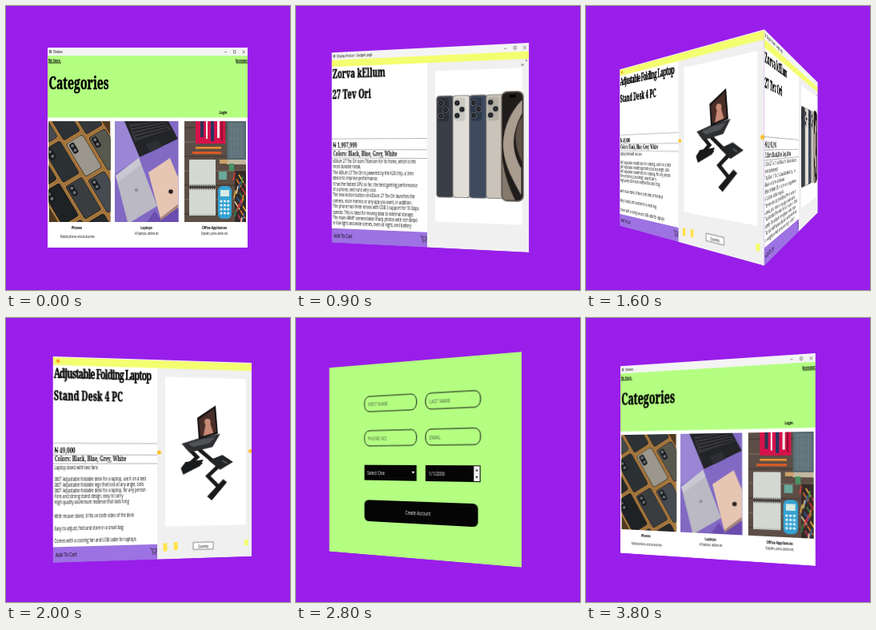
An HTML page that plays this animation: 355 px wide and 355 px high, repeating every 3.9 s.

```html
<!DOCTYPE html>
<html lang="en">
<head>
<meta charset="utf-8">
<title>Shop cube</title>
<style>
  html, body { margin: 0; width: 100%; height: 100%; overflow: hidden; background: #991eea; }
  #stage { position: relative; width: 355px; height: 355px; overflow: hidden; perspective: 308px; perspective-origin: 177px 177px; }
  #cube { position: absolute; left: 52px; top: 52px; width: 250px; height: 250px; transform-style: preserve-3d; }
  .face { position: absolute; inset: 0; width: 250px; height: 250px; backface-visibility: hidden; }
  text { font-family: "Open Sans", "Noto Sans", sans-serif; white-space: pre; }
  .serif { font-family: "Noto Serif", serif; font-weight: bold; }
  .heavy { font-weight: 900; stroke: #000; stroke-width: .5px; }
  .label { font-weight: bold; }
</style>
</head>
<body>
<div id="stage"><div id="cube"></div></div>
<script>
const LOOP = 3900, STEP = 100;
const GREEN = '#b4ff82', YELLOW = '#f4ff70', INK = '#050505';

// Drawing helpers; pages are wide windows squeezed into square faces.
const text = (x, y, size, str, attrs = '') =>
  `<text transform="translate(${x} ${y}) scale(.67 1)" font-size="${size}" ${attrs}>${str}</text>`;
const mid = (x, y, size, str, attrs = '') => text(x, y, size, str, `text-anchor="middle" ${attrs}`);
const rect = (x, y, w, h, fill, attrs = '') =>
  `<rect x="${x}" y="${y}" width="${w}" height="${h}" fill="${fill}" ${attrs}/>`;
const disc = (x, y, r, fill) => `<circle cx="${x}" cy="${y}" r="${r}" fill="${fill}"/>`;
const poly = (points, fill) => `<polygon points="${points}" fill="${fill}"/>`;
const line = (d, color = '#555', width = .6) =>
  `<path d="${d}" fill="none" stroke="${color}" stroke-width="${width}"/>`;
const photo = (x, y, w, h, body) => `<svg x="${x}" y="${y}" width="${w}" height="${h}">${body}</svg>`;
const repeat = (n, fn) => Array.from({ length: n }, (_, i) => fn(i)).join('');

const titleBar = name => rect(0, 0, 250, 10, '#f4f4f4') + rect(2, 3, 3, 4, '#888') +
  text(7, 7.2, 5, name) +
  line('M221 5.5h3M232.5 3.5h2.5v3.5h-2.5zM243.5 3.5l3 4m0-4l-3 4', '#333', .5);

function phonesPhoto() {
  const colors = ['#3a3d3f', '#57594f', '#2b3033', '#33373a', '#454b50', '#1f2224', '#9b978c', '#26292b', '#2e3235'];
  const phones = repeat(16, i => {
    const x = (i % 4) * 28 - 54, y = Math.floor(i / 4) * 53 - 108 + (i % 4) * 8;
    return rect(x - 2, y - 2, 28, 53, '#a9793f') + rect(x + .5, y + .5, 24, 48, '#111', 'rx="3"') +
      rect(x + 1, y + 1, 23, 47, colors[(i * 4) % 9], 'rx="3"') +
      rect(x + 3, y + 3, 7, 14, '#17191b', 'rx="2"') +
      disc(x + 6.5, y + 6.5, 2, '#6c7378') + disc(x + 6.5, y + 13, 2, '#6c7378');
  });
  return rect(0, 0, 77, 126, '#4f3920') + `<g transform="translate(39 63) rotate(-31)">${phones}</g>`;
}

function laptopsPhoto() {
  return rect(0, 0, 80, 126, '#8269c4') + poly('0,0 14,0 32,46 0,66', '#9a86d4') +
    poly('50,112 57,122 80,108 80,126 40,126', '#6a4dae') +
    poly('12,0 67,0 79,22 31,45', '#232428') + poly('18,4 62,0 70,10 25,25', '#36373c') +
    repeat(4, i => line(`M${20 + i * 2} ${8 + i * 4}l${44 - i} -${8 + i}`, '#141416', 1)) +
    poly('39,29 54,23 59,32 44,39', '#2e2f34') +
    poly('1,68 30,46 53,106 20,126 16,126', '#bab9c4') + poly('1,68 30,46 33,54 4,76', '#c9c8d2') +
    disc(27, 86, 2.2, '#92919b') +
    poly('42,64 69,46 79,70 79,104 57,121', '#e6c6b2') + poly('57,121 79,104 79,108 57,124', '#a98574') +
    disc(70, 88, 2.8, '#2a2020');
}

function officePhoto() {
  const notebook = (y, h) => rect(6, y, 33, h, '#d3d8d1', 'rx="1"') + line(`M8 ${y + h - 1}h30`, '#aab0aa', 1);
  const crayons = ['#d83a34', '#e9b63b', '#37864b', '#e87b2d', '#2e5c9b', '#c9355c', '#e8d5a4'];
  return rect(0, 0, 77, 126, '#5c4e46') +
    repeat(7, i => line(`M0 ${18 * i + 8}h77`, i % 2 ? '#74665d' : '#463a34', 1.5)) +
    rect(14, 0, 37, 28, '#d5124a') + rect(20, 0, 4, 20, '#2b3454') + rect(27, 0, 2, 22, '#f3ecec') +
    rect(33, 0, 4, 25, '#26365e') + rect(41, 0, 3, 21, '#f3ecec') + rect(46, 0, 2, 24, '#8d1030') +
    rect(53, 0, 24, 54, '#c2b7a0') + rect(53, 0, 24, 48, '#52656d') + rect(55, 2, 20, 44, '#677a81') +
    repeat(5, i => line(`M55 ${7 + i * 9}h20M${57 + i * 4} 2v44`, '#53666e', .5)) +
    rect(14, 32, 32, 2.5, '#e8912d') + rect(10, 38, 36, 3, '#dc5a26') +
    notebook(48, 33) + notebook(84, 34) +
    repeat(14, i => rect(7 + i * 2.3, 79.5, 1, 6, '#333')) +
    rect(44, 48, 10, 5, '#c9a06a') + rect(43, 63, 10, 10, '#69a89a') + rect(56, 53, 6, 9, '#4a9363') +
    rect(42, 81, 17, 41, '#35a3d2', 'rx="6"') + rect(45, 86, 11, 8, '#d8ebe4') +
    repeat(12, i => disc(46 + (i % 3) * 4.4, 100 + Math.floor(i / 3) * 5, 1.6, '#e8f5f8')) +
    rect(63, 62, 14, 64, '#342a28') +
    repeat(21, i => line(`M${63 + (i * 5) % 13} ${64 + i * 2.8}l${i % 2 ? 6 : -2} 10`, crayons[i % 7], 1.5));
}

function categories() {
  return rect(0, 0, 250, 250, '#fff') + titleBar('Shelves') + rect(0, 10, 250, 77.5, GREEN) +
    text(.8, 17.8, 5, 'My Store', 'class="serif"') + line('M.8 19H17', '#000', .9) +
    text(235, 17.8, 5, 'Inventory', 'class="serif"') + line('M235.5 19H250', '#000', .9) +
    text(1.5, 51.5, 21, 'Categories', 'class="serif heavy"') +
    text(214.5, 82.5, 5.5, 'Login', 'class="label"') +
    photo(1.5, 92, 77, 126, phonesPhoto()) +
    photo(84, 92, 79.5, 126, laptopsPhoto()) +
    photo(171, 92, 77, 126, officePhoto()) +
    mid(36.5, 226.5, 5.4, 'Phones', 'class="label"') +
    mid(37.5, 237.5, 4.4, 'Mobile phones and accessories') +
    mid(123.5, 226.5, 5.4, 'Laptops', 'class="label"') +
    mid(124, 234, 4.4, 'All laptops, tablets etc') +
    mid(208.5, 226.5, 5.4, 'Office Appliances', 'class="label"') +
    mid(208.5, 234, 4.4, 'Staplers, pens, desks etc');
}

// Shared product page; "top" is the height of the window bar.
function product(top, { title, price, body, picture }) {
  return rect(0, 0, 250, 250, '#f0f0f0') + rect(0, top, 127, 231 - top, '#fff') +
    rect(0, top, 250, 9.5, YELLOW) +
    title.map(([str, spacing], i) =>
      text(1, top + 24.5 + i * 27, 15.5, str, `class="serif heavy" letter-spacing="${spacing}"`)).join('') +
    line(`M0 ${top + 104}H127M0 ${top + 118.2}H127M0 ${top + 129}H127`, '#667', .5) +
    text(1.5, top + 115.5, 9, price, 'class="serif"') +
    text(2, top + 126.3, 8.1, 'Colors: Black, Blue, Grey, White', 'class="serif"') +
    body.map(([y, str]) => text(1.5, y, 6.2, str)).join('') +
    rect(0, 231, 127, 19, '#9d72e2') + text(3, 243, 7, 'Add To Cart') +
    line('M118 236h2l1.5 5h4l1-4h-5.5', '#222', .7) + disc(122, 243, .8, '#222') + disc(125, 243, .8, '#222') +
    rect(137, top + 20, 105, 188, '#fff') + picture;
}

function handsets() {
  const backs = [['#3a3f47', '#2b2f36'], ['#e0ddd7', '#cbc8c1'], ['#3f4a5f', '#2e384a'], ['#c9c3b9', '#b3ada3']];
  const back = ([body, block], i) => {
    const x = 138.5 + i * 20.3;
    return rect(x, 60.5, 22, 126.5, '#77736d', 'rx="4"') + rect(x + .8, 61.3, 20, 125, body, 'rx="4"') +
      rect(x + 2, 63.5, 13.5, 29, block, 'rx="4"') +
      [[5.6, 70], [5.6, 85.5], [11.6, 78]].map(([dx, y]) =>
        disc(x + dx, y, 3.5, '#8b8d90') + disc(x + dx, y, 2.9, '#121417') +
        disc(x + dx, y, 1, '#59616c')).join('');
  };
  return backs.map(back).join('') +
    rect(217.5, 57, 26.5, 133, '#6f6861', 'rx="7"') + rect(218.7, 58.5, 24, 130, '#1f1c1b', 'rx="6"') +
    '<path d="M242 68C228 82 219 104 220 126C222 150 233 166 241 182V150C233 136 231 122 233 110C235 98 239 90 242 84Z" fill="#aa9d90"/>' +
    '<path d="M242 88C232 102 232 122 242 142Z" fill="#5e5147"/>' +
    '<path d="M219 140C222 160 228 176 234 188H223Q219 188 219 182Z" fill="#85786c"/>' +
    rect(227, 61.5, 8, 3, '#000', 'rx="1.5"');
}

function phonePage() {
  const lines = [
    'kEllum 27 Tev Ori uses Titanium for its frame, which is the',
    'most durable metal.',
    'The kEllum 27 Tev Ori is powered by the K28 chip, a 3nm',
    'device to improve performance.',
    'It has the fastest GPU so far, the best gaming performance',
    'of a phone, and runs very cool.',
    'The new Action button on kEllum 27 Tev Ori launches the',
    'camera, voice memos or any app you want, in addition.',
    'The phone has three lenses with USB 3 support for 10 Gbps',
    'speeds. This is ideal for moving data to external storage.',
    'The main 48MP camera takes sharp photos with rich detail',
    'in low light and wide scenes, even at night, and battery'];
  return product(9.5, {
    title: [['Zorva kEllum', 0], ['27 Tev Ori', 0]],
    price: '₦ 1,997,999',
    body: lines.map((str, i) => [145 + i * 7.4, str]),
    picture: handsets() + line('M247 20v2M241 26h3', '#444', 1)
  }) + titleBar('Display Product - Gadgets page');
}

function foldingDesk() {
  const black = '#191a1b';
  return line('M164 108L178 122 160 138 184 128 M178 110L206 133 192 146 206 160', black, 5) +
    poly('157,136 163,128 186,125 182,133 160,144', black) +
    poly('191,172 212,150 217,154 197,177', black) +
    poly('193,126 211,119 225,128 208,138', '#242527') + line('M211 126l6 4', '#555', 2) +
    poly('158,105 180,98 208,92 198,109 168,116', '#2d2e30') +
    poly('166,105 184,99 202,96 194,104 173,109', '#505257') +
    poly('178,72 202,56 205,92 180,99', '#111') + poly('180,74 200,60 203,90 182,96', '#4a2e28') +
    poly('186,95 189,80 195,79 199,91', '#c98a77') + disc(191.5, 77, 4, '#c98a77');
}

function deskPage() {
  const controls = disc(129.5, 116, 2.5, '#ffc21f') + disc(248, 114, 2.5, '#ffc21f') +
    rect(134.5, 230, 5, 10, '#ffe34a') + rect(148, 229, 5, 10, '#ffe34a') +
    rect(173, 230, 26, 9, '#fff', 'stroke="#555" stroke-width=".7"') + mid(186, 236.5, 5, 'Quantity') +
    rect(240, 228, 5, 8, YELLOW);
  return product(1, {
    title: [['Adjustable Folding Laptop', -1.2], ['Stand Desk 4 PC', 0]],
    price: '₦ 49,000',
    body: [
      [137, 'Laptop stand with two fans'],
      [151, '360° Adjustable foldable desk for a laptop, use it on a bed'],
      [158, '360° Adjustable foldable legs that lock at any angle, sofa'],
      [165, '360° Adjustable foldable desk for a laptop, for any person'],
      [172, 'Firm and strong stand design, easy to carry'],
      [179, 'High quality aluminium material that lasts long'],
      [196, 'With mouse stand, it fits on both sides of the desk'],
      [211, 'Easy to adjust, fold and store in a small bag'],
      [226, 'Comes with a cooling fan and USB cable for laptops']],
    picture: foldingDesk() + controls
  }) + rect(0, 0, 250, 1, '#f4f4f4') + disc(6, 5.5, 2.2, '#ff9f1c');
}

function signUp() {
  const field = (x, y, w, hint) =>
    rect(x, y, w, 20, 'none', 'rx="7" ry="9" stroke="#111" stroke-width="1"') +
    text(x + 5, y + 13, 7.4, hint, 'fill="#4c6143"');
  return rect(0, 0, 250, 250, GREEN) +
    field(52, 42, 71.5, 'FIRST NAME') + field(135, 42, 68, 'LAST NAME') +
    field(52, 87, 71.5, 'PHONE NO.') + field(135, 87, 68, 'EMAIL') +
    rect(52, 132, 71.5, 20, INK) + text(56, 145, 7.4, 'Select One', 'fill="#fff"') +
    poly('117,140 121,140 119,143', '#fff') +
    rect(135, 132, 68, 20, INK) + text(139, 145, 7.4, '1/1/2000', 'fill="#fff"') +
    rect(195, 133, 7, 18, '#f4f4f4') +
    poly('197,139 200,139 198.5,136', '#222') + poly('197,145 200,145 198.5,148', '#222') +
    rect(52, 178, 148, 28, INK, 'rx="6"') + mid(125, 195, 7, 'Create Account', 'fill="#fff"');
}

const cube = document.getElementById('cube');
const faces = [[categories, 0], [phonePage, -90], [deskPage, 180], [signUp, 90]];
cube.innerHTML = faces.map(([draw, angle]) =>
  `<svg class="face" viewBox="0 0 250 250" style="transform:rotateY(${angle}deg) translateZ(125px)">${draw()}</svg>`).join('');

const start = performance.now();
function frame() {
  const elapsed = (performance.now() - start) % LOOP;
  const angle = Math.floor(elapsed / STEP) * STEP / LOOP * 360;
  cube.style.transform = `translateZ(-125px) rotateY(${angle}deg)`;
  requestAnimationFrame(frame);
}
frame();
</script>
</body>
</html>
```
